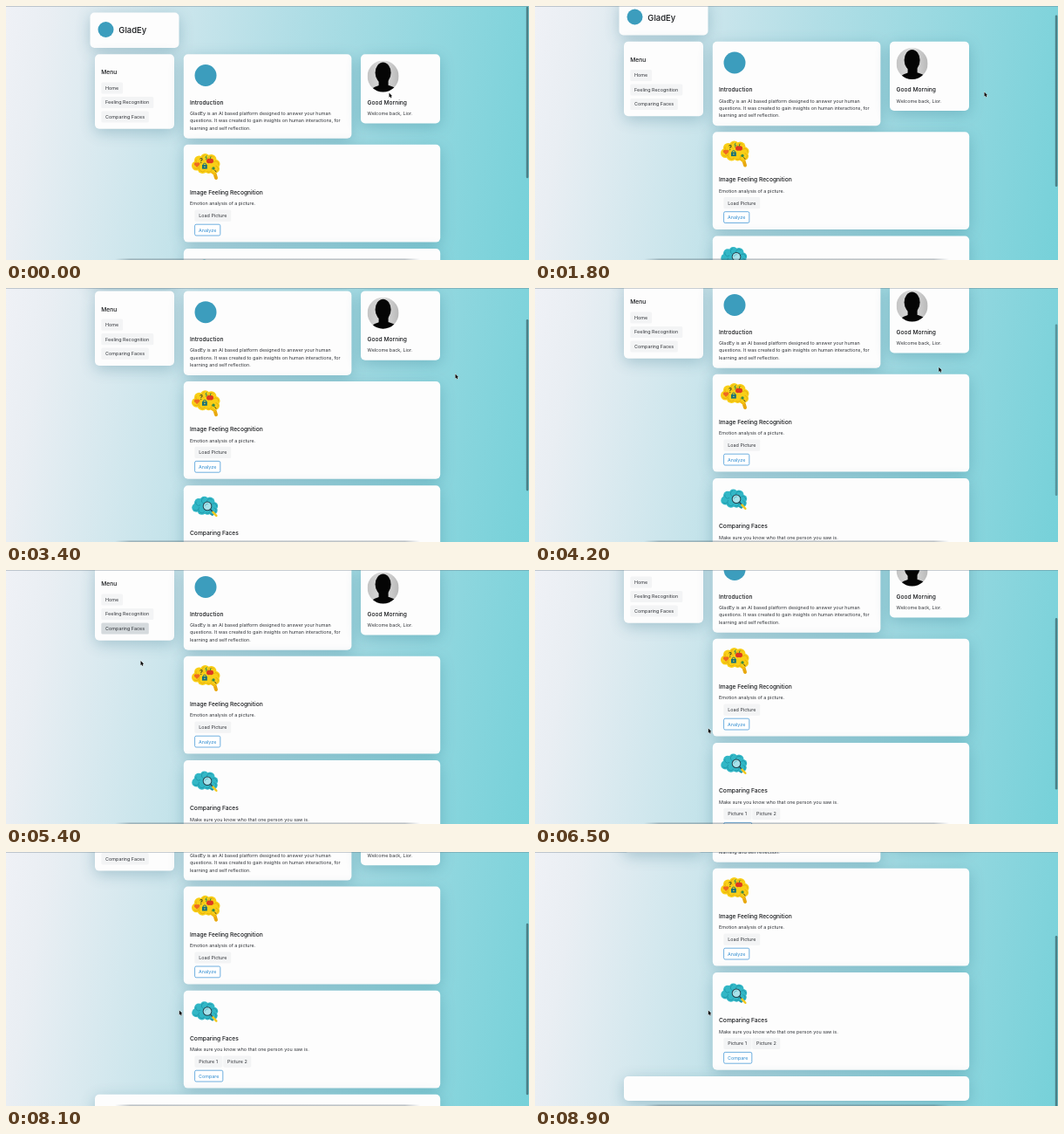
Animation of 600 by 291 pixels, one loop 9 s. Source, as an HTML page with a canvas:

```html
<!DOCTYPE html>
<html lang="en">
<head>
<meta charset="utf-8">
<title>GladEy</title>
<style>
html, body { margin: 0; width: 100%; height: 100%; overflow: hidden; background: #b2e0e7; }
canvas { display: block; width: 600px; height: 291px; }
</style>
</head>
<body>
<canvas id="stage"></canvas>
<script>
const W = 600, H = 291, LOOP = 9000, STEP = 100;
const canvas = document.getElementById('stage');
const ctx = canvas.getContext('2d');
const dpr = window.devicePixelRatio || 1;
canvas.width = Math.round(W * dpr);
canvas.height = Math.round(H * dpr);

// Each track is a list of [time, ...values]
const scrollTrack = [[0, 0], [700, 0], [1200, 5], [1800, 14.5], [2400, 28], [3000, 43],
  [3400, 51.8], [3800, 60], [6000, 60], [6500, 80], [7400, 101], [8900, 140]];
const cursorTrack = [[0, 439.5, 99.5], [700, 515.5, 98.5], [4100, 515.5, 98.5], [4800, 150, 44],
  [5100, 124, 33], [5200, 130, 49], [5300, 142, 67], [5400, 154.5, 104],
  [5900, 198.8, 181.5], [9000, 198.8, 181.5]];
const barTrack = [[0, 1], [4100, 1], [4500, 0], [6000, 0], [6100, 1], [9000, 1]];

function sample(track, t) {
  let i = 1;
  while (i < track.length - 1 && track[i][0] < t) i++;
  const a = track[i - 1], b = track[i];
  const k = Math.min(1, Math.max(0, (t - a[0]) / (b[0] - a[0])));
  return a.slice(1).map((v, n) => v + (b[n + 1] - v) * k);
}

function box(x, y, w, h, r) {
  ctx.beginPath();
  ctx.roundRect(x, y, w, h, r);
}

function disc(x, y, r, color) {
  ctx.beginPath();
  ctx.arc(x, y, r, 0, Math.PI * 2);
  ctx.fillStyle = color;
  ctx.fill();
}

function stroke(points, color, width) {
  ctx.beginPath();
  points.forEach(([x, y]) => ctx.lineTo(x, y));
  ctx.strokeStyle = color;
  ctx.lineWidth = width;
  ctx.lineCap = ctx.lineJoin = 'round';
  ctx.stroke();
}

function text(str, x, y, size = 5.42, weight = 400, color = '#303338') {
  ctx.font = `${weight} ${size}px Inter, "Liberation Sans", sans-serif`;
  ctx.fillStyle = color;
  ctx.fillText(str, x, y);
}

const heading = (str, x, y) => text(str, x, y, 6.65, 500, '#17191c');

function card(x, y, w, h) {
  ctx.save();
  ctx.shadowColor = 'rgba(40, 105, 130, 0.3)';
  ctx.shadowBlur = 17 * dpr;
  ctx.shadowOffsetY = 4 * dpr;
  ctx.fillStyle = '#fdfdfd';
  box(x, y, w, h, 5);
  ctx.fill();
  ctx.restore();
}

function button(label, x, mid, w, pointer) {
  const over = pointer && pointer[0] > x && pointer[0] < x + w && Math.abs(pointer[1] - mid) < 7;
  ctx.fillStyle = over ? '#d5dadd' : '#f3f4f5';
  box(x, mid - 6.6, w, 13.2, 1.6);
  ctx.fill();
  text(label, x + 4.8, mid + 1.95);
}

function outlineButton(label, x, mid, w) {
  box(x + 0.4, mid - 6.4, w - 0.8, 12.8, 1.6);
  ctx.fillStyle = '#fff';
  ctx.fill();
  ctx.strokeStyle = '#4b9bd8';
  ctx.lineWidth = 0.8;
  ctx.stroke();
  text(label, x + 4.8, mid + 1.95, 5.42, 400, '#2e8bd0');
}

const lobes = [[6, 14, 5.5], [9, 8, 5.5], [16, 5.5, 5.5], [23, 7, 6], [28, 12, 5],
  [27.5, 17.5, 5], [20, 18, 5], [13, 17, 6], [17, 12, 7], [23, 13, 6]];

function brain(color, fold) {
  lobes.forEach(([x, y, r]) => disc(x, y, r, color));
  lobes.slice(0, 8).forEach(([x, y, r], i) => {
    ctx.beginPath();
    ctx.arc(x, y, r * 0.65, i, i + 2.4);
    ctx.strokeStyle = fold;
    ctx.lineWidth = 0.7;
    ctx.stroke();
  });
}

function feelingArt(x, y) {
  ctx.save();
  ctx.translate(x, y);
  stroke([[23, 20], [27, 23], [28.5, 28]], '#e8a80f', 4);
  brain('#f9cf17', '#e0a40c');
  stroke([[23, 21], [27, 24]], '#f4bd12', 2);
  // heart
  disc(5.2, 12, 1.8, '#ee6a22');
  disc(8, 12, 1.8, '#ee6a22');
  ctx.beginPath();
  ctx.moveTo(3.5, 12.6);
  ctx.lineTo(9.7, 12.6);
  ctx.lineTo(6.6, 16);
  ctx.fill();
  text('?', 9.5, 10.5, 7, 700, '#3d4a2c');
  // apple
  disc(20.2, 8.5, 2.7, '#dd3a22');
  disc(22.8, 8.5, 2.7, '#dd3a22');
  stroke([[21.6, 6], [22.5, 3.8]], '#33803b', 1);
  // padlock
  ctx.fillStyle = '#16707a';
  ctx.fillRect(12.5, 13, 5.8, 4.6);
  ctx.beginPath();
  ctx.arc(15.4, 13, 1.9, Math.PI, 0);
  ctx.strokeStyle = '#16707a';
  ctx.lineWidth = 0.9;
  ctx.stroke();
  disc(15.4, 15.2, 0.8, '#f4d63c');
  stroke([[17.5, 2.5], [16.3, 4.8], [18, 4.8], [17, 7]], '#2d8a59', 0.9);
  disc(25.5, 17, 1.7, '#3b8a46');
  stroke([[27, 19], [28.5, 21]], '#5b4a22', 1);
  ctx.restore();
}

function compareArt(x, y) {
  ctx.save();
  ctx.translate(x, y);
  ctx.scale(0.92, 0.92);
  stroke([[22, 19], [26, 22]], '#1d93a5', 4);
  brain('#32b7c6', '#178a9e');
  disc(19.8, 12.2, 5.8, '#25434f');
  disc(19.8, 12.2, 4.7, '#a9e2ea');
  ctx.beginPath();
  ctx.arc(19.8, 12.2, 2.8, 3.3, 5);
  ctx.strokeStyle = '#5dc0ce';
  ctx.lineWidth = 1;
  ctx.stroke();
  stroke([[24, 16.6], [26, 18.8]], '#25434f', 1.5);
  stroke([[26.8, 19.7], [31, 24.2]], '#f2c81f', 2.7);
  ctx.restore();
}

function portrait(x, y, r) {
  ctx.save();
  ctx.beginPath();
  ctx.arc(x, y, r, 0, Math.PI * 2);
  ctx.clip();
  const g = ctx.createLinearGradient(x - r, 0, x + r, 0);
  g.addColorStop(0, '#c4c4c4');
  g.addColorStop(0.5, '#dedede');
  g.addColorStop(1, '#b8b8b8');
  ctx.fillStyle = g;
  ctx.fillRect(x - r, y - r, r * 2, r * 2);
  ctx.fillStyle = '#050505';
  ctx.beginPath();
  ctx.ellipse(x, y - 4, 9, 12, 0, 0, Math.PI * 2);
  ctx.fill();
  ctx.fillRect(x - 5, y + 3, 11, 11);
  ctx.beginPath();
  ctx.ellipse(x + 1, y + 18, 15, 8, 0, 0, Math.PI * 2);
  ctx.fill();
  ctx.restore();
}

function backdrop() {
  const g = ctx.createLinearGradient(-15, 90, 615, 201);
  g.addColorStop(0, '#eff1f6');
  g.addColorStop(0.08, '#e9eef3');
  g.addColorStop(0.5, '#b2dee6');
  g.addColorStop(1, '#76d1d9');
  ctx.fillStyle = g;
  ctx.fillRect(0, 0, W, H);
}

function page(pointer) {
  card(96.5, 7.5, 102, 40.5);
  card(102, 55.2, 91, 85.6);
  card(203.8, 55.2, 192.6, 96.6);
  card(407, 55.2, 91, 79.3);
  card(203.8, 158.8, 294.4, 111.8);
  card(203.8, 278, 294.4, 111.8);
  card(102, 397, 396.2, 28);

  disc(114.5, 27, 9, '#3c9dbd');
  text('GladEy', 129.3, 31.3, 9.5, 500, '#17191c');

  heading('Menu', 109.3, 78.4);
  button('Home', 109.3, 94, 24.8, pointer);
  button('Feeling Recognition', 109.3, 110.5, 60, pointer);
  button('Comparing Faces', 109.3, 127, 54.5, pointer);

  disc(229, 79.5, 12.5, '#3c9dbd');
  heading('Introduction', 211, 112.5);
  ['GladEy is an AI based platform designed to answer your human',
   'questions. It was created to gain insights on human interactions, for',
   'learning and self reflection.'].forEach((line, i) => text(line, 211, 125 + i * 8.45));

  portrait(432.6, 80.5, 18);
  heading('Good Morning', 414.6, 112.5);
  text('Welcome back, Lior.', 414.6, 125);

  feelingArt(212.5, 169);
  heading('Image Feeling Recognition', 211, 215.9);
  text('Emotion analysis of a picture.', 211, 228.4);
  button('Load Picture', 216.4, 240.2, 41.8);
  outlineButton('Analyze', 216.2, 256.6, 30);

  compareArt(212.8, 290.5);
  heading('Comparing Faces', 211, 335.1);
  text('Make sure you know who that one person you saw is.', 211, 347.6);
  button('Picture 1', 216.4, 359.3, 32);
  button('Picture 2', 249.2, 359.3, 32);
  outlineButton('Compare', 216.2, 375.8, 33);
}

function edges() {
  ctx.fillStyle = 'rgba(85, 105, 120, 0.4)';
  ctx.fillRect(0, 0, W, 0.8);
  const g = ctx.createLinearGradient(125, 0, 475, 0);
  g.addColorStop(0, 'rgba(70, 85, 95, 0)');
  g.addColorStop(0.05, 'rgba(70, 85, 95, 0.35)');
  g.addColorStop(0.95, 'rgba(70, 85, 95, 0.35)');
  g.addColorStop(1, 'rgba(70, 85, 95, 0)');
  ctx.fillStyle = g;
  ctx.fillRect(125, 289.4, 350, 1.6);
}

function scrollbar(scroll, alpha) {
  ctx.fillStyle = `rgba(55, 95, 102, ${0.72 * alpha})`;
  box(596.8, 0.7 + scroll * 0.68, 2.6, 196.5, 1.3);
  ctx.fill();
}

function arrow(x, y) {
  ctx.beginPath();
  [[0, 0], [0, 5.2], [1.2, 4.2], [2, 6], [2.9, 5.6], [2.1, 3.8], [3.7, 3.7]]
    .forEach(([dx, dy]) => ctx.lineTo(x + dx, y + dy));
  ctx.closePath();
  ctx.strokeStyle = 'rgba(255, 255, 255, 0.85)';
  ctx.lineWidth = 0.9;
  ctx.stroke();
  ctx.fillStyle = '#0a0a0a';
  ctx.fill();
}

function draw(t) {
  const [scroll] = sample(scrollTrack, t);
  const [px, py] = sample(cursorTrack, t);
  // Hover highlight trails the pointer by one step
  const [hx, hy] = sample(cursorTrack, Math.max(0, t - STEP));
  ctx.setTransform(dpr, 0, 0, dpr, 0, 0);
  backdrop();
  ctx.save();
  ctx.translate(0, -scroll);
  page([hx, hy + scroll]);
  ctx.restore();
  edges();
  scrollbar(scroll, sample(barTrack, t)[0]);
  arrow(px, py);
}

const start = performance.now();
function tick() {
  const t = (performance.now() - start) % LOOP;
  draw(Math.floor(t / STEP) * STEP);
  requestAnimationFrame(tick);
}
tick();
</script>
</body>
</html>
```
